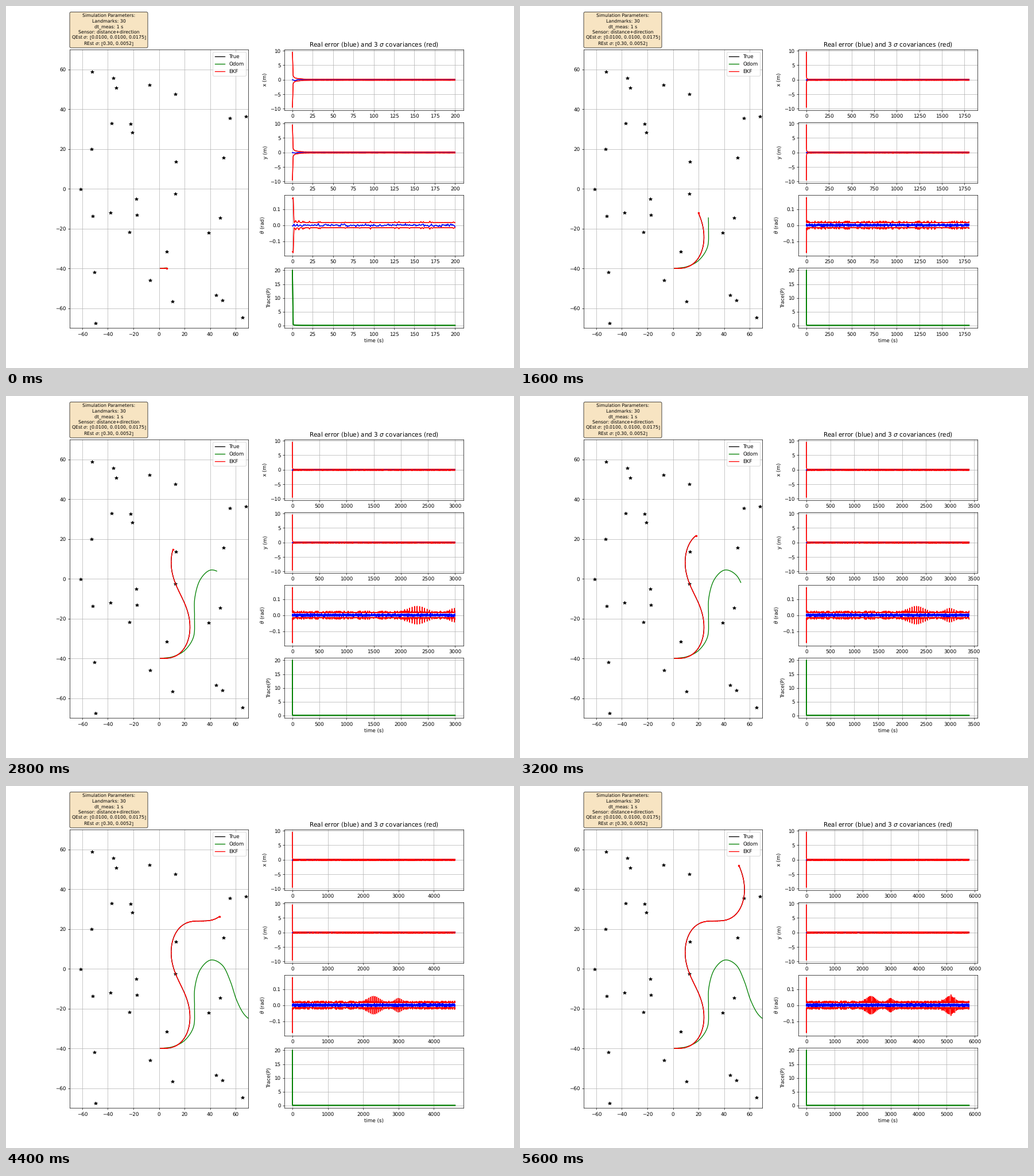
A matplotlib script for the animation above (5.8 s loop, 885 by 632 pixels).

```python
import numpy as np
import matplotlib.pyplot as plt
from matplotlib.animation import FuncAnimation
from matplotlib.patches import FancyBboxPatch
from matplotlib.transforms import IdentityTransform

W, H, DPI = 885, 632, 63.2
FRAMES, INTERVAL, STEP = 29, 200, 200
N = FRAMES * STEP

plt.rcParams["text.hinting"] = "none"
np.random.seed(123456)
landmarks = 140 * (np.random.rand(2, 30) - .5)
rng = np.random.default_rng(7)
t = np.arange(N + 1)

# Drifting odometry, one key point every DRIFT_STEP seconds
DRIFT_STEP = 400
DRIFT = np.array([
    (1, -40), (10.9, -39.1), (20.4, -35.8), (27.1, -29), (27.8, -19.5),
    (28, -9.7), (32.1, -.6), (40.4, 4.4), (49.7, 1.7), (55.8, -6.2),
    (60.4, -15.2), (66.3, -22.6), (74, -27)])

PARAMS = ["Simulation Parameters:", "Landmarks: 30", "dt_meas: 1 s",
          "Sensor: distance+direction",
          r"QEst $\sigma$: [0.0100, 0.0100, 0.0175]",
          r"REst $\sigma$: [0.30, 0.0052]"]


def spline(pts, at):
    """Smooth curve through evenly timed points; at counts in points."""
    slope = np.gradient(pts, axis=0)
    k = np.clip(at.astype(int), 0, len(pts) - 2)
    u = np.clip(at - k, 0, 1)[:, None]
    return ((1 + 2 * u) * (1 - u) ** 2 * pts[k] + u * (1 - u) ** 2 * slope[k]
            + u * u * (3 - 2 * u) * pts[k + 1] + u * u * (u - 1) * slope[k + 1])


def bump(centre, width):
    return np.exp(-((t - centre) / width) ** 2)


def noise(sigma):
    return sigma * rng.standard_normal(N + 1)


def bound():
    """Three-sigma bound of a position, dropping fast at the start."""
    s = .17 + .04 * rng.random(N + 1) + .4 * bump(0, 9) + .8 * np.exp(1. - t)
    s[0] = 3 * np.sqrt(10)
    return s


# True motion: constant speed, sinusoidal turn rate
turn = np.radians(.1) * np.sin(3 * np.pi * t / 6000)
heading = np.cumsum(turn) - turn
moves = .025 * np.column_stack([np.cos(heading), np.sin(heading)])
true = np.array([1, -40]) + np.cumsum(moves, axis=0) - moves
odom = spline(DRIFT, t / DRIFT_STEP)

# Errors and bounds
err_x = .05 + noise(.05) - .35 * bump(3, 2)
err_y = noise(.04) - .15 * bump(4, 4)
err_th = np.clip(noise(.004), -.011, .011)
sig_x, sig_y = bound(), bound()

swell = .04 * bump(2300, 230) + .027 * bump(3000, 150) + .04 * bump(5120, 240)
sig_th = .0155 + .001 * rng.random(N + 1)
sig_th += .01 * rng.random(N + 1) * (rng.random(N + 1) < .1)
sig_th += swell * (t % 46 == 0) + .013 * (bump(4, .8) + bump(8, .8))
sig_th[:2] = .1657, .172

trace = .03 + .25 * np.exp(1. - t) + .05 * bump(0, 9)
trace[0] = 20

ekf = true + .3 * np.column_stack([err_x, err_y])

fig = plt.figure(figsize=((W + .01) / DPI, (H + .01) / DPI), dpi=DPI)
world = fig.add_subplot(1, 2, 1)
world.plot(*landmarks, "*k")
routes = [(world.plot([], [], color, label=name)[0], path) for color, name, path in
          (("k", "True", true), ("g", "Odom", odom), ("r", "EKF", ekf))]
robot, = world.plot([], [], ".r")
world.axis([-70, 70, -70, 70])
world.grid(True)
world.legend(loc="upper right")

# Parameter box, laid out in pixels; lines with a symbol are taller
px = IdentityTransform()
fig.add_artist(FancyBboxPatch(
    (111, H - 73), 136, 62.5, boxstyle="round,pad=0,rounding_size=2.4",
    fc="wheat", ec="k", alpha=.8, transform=px))
y = H - 9.7
for line in PARAMS:
    y -= 10.5 if "$" in line else 9.5
    fig.text(179.2, y, line, fontsize=9, ha="center", va="baseline", transform=px)

charts, curves = [], []


def chart(row, label, limits, series, lw):
    ax = fig.add_subplot(4, 2, 2 * row)
    # Drawn twice, as a plot that is updated without being cleared
    for color, data in series * 2:
        curves.append((ax.plot([], [], color, lw=lw)[0], data))
    ax.set_ylim(*limits)
    ax.set_ylabel(label)
    ax.grid(True)
    charts.append(ax)
    return ax


rows = [("x (m)", err_x, sig_x), ("y (m)", err_y, sig_y),
        (r"$\theta$ (rad)", err_th, sig_th)]
for row, (label, err, sig) in enumerate(rows, 1):
    top = 1.1 * sig.max()
    chart(row, label, (-top, top), [("b", err), ("r", sig), ("r", -sig)], 1.5)
charts[0].set_title(r"Real error (blue) and 3 $\sigma$ covariances (red)")
chart(4, "Trace(P)", (-1, 21), [("g", trace)], 2).set_xlabel("time (s)")


def update(i):
    end = STEP * (i + 1)
    now = slice(0, end + 1)
    for line, path in routes:
        line.set_data(*path[now].T)
    robot.set_data(*ekf[end:end + 1].T)
    for line, data in curves:
        line.set_data(t[now], data[now])
    for ax in charts:
        ax.set_xlim(-.05 * end, 1.05 * end)
    return []


anim = FuncAnimation(fig, update, frames=FRAMES, interval=INTERVAL,
                     repeat=True, repeat_delay=0, blit=False)
plt.show()
```
